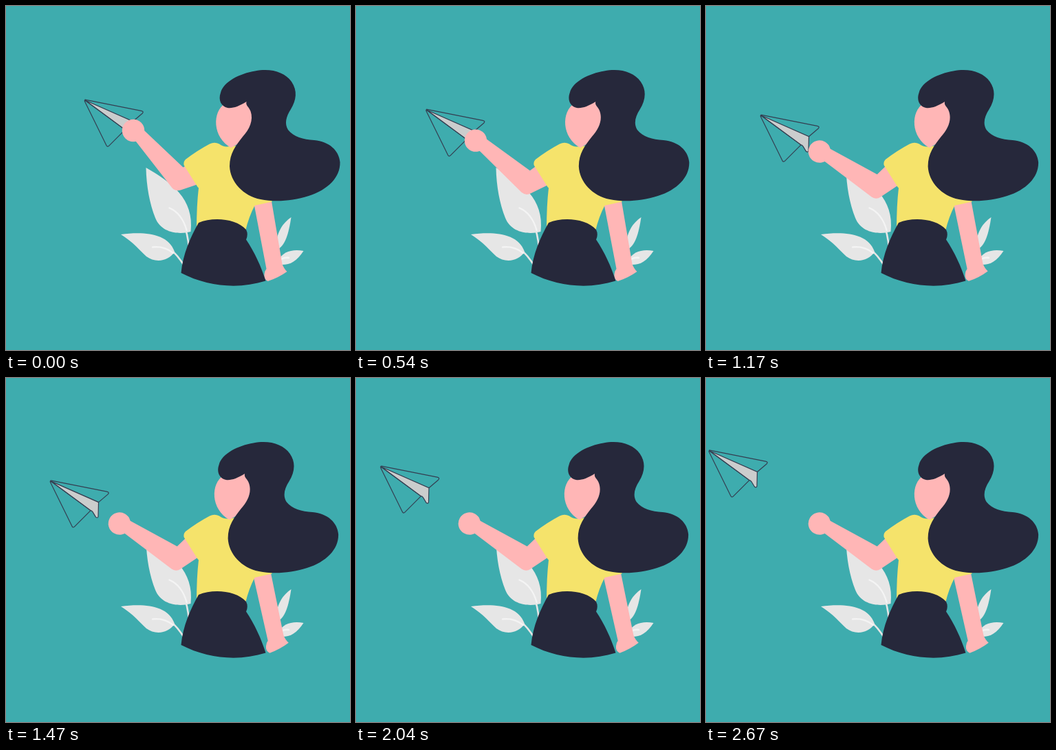
An HTML page for the animation above (2.73 s loop, 500 by 500 pixels).

```html
<!DOCTYPE html>
<html lang="en">
<head>
<meta charset="utf-8">
<title>Paper plane</title>
<style>
  html, body { margin: 0; width: 100%; height: 100%; overflow: hidden; background: #3eacae; }
  svg { display: block; width: 100vw; height: 100vh; }
  .leaf { fill: #e6e6e6; }
  .stem { fill: none; stroke: #e6e6e6; stroke-width: 2.6; }
  .vein { fill: none; stroke: #f4f4f4; stroke-width: 2.4; stroke-linecap: round; }
  .skin { fill: #ffb6b6; }
  .dark { fill: #26283b; }
  .shirt { fill: #f5e36b; }
  .plane path { fill: none; stroke: #343e51; stroke-width: 1.2; stroke-linejoin: round; }
  .plane .fold { fill: #cbcdcd; }
</style>
</head>
<body>
<svg viewBox="0 0 500 500">
  <rect width="500" height="500" fill="#3eacae"/>

  <g>
    <path class="stem" d="M258 316Q264 330 266 352M238 353Q249 361 260 379"/>
    <path class="leaf" d="M203.500 235C240 256 274 280 268.500 328C250 333 225 329 217 308C209 288 204 262 203.500 235Z"/>
    <path class="leaf" d="M167 332C198 328 235 329 245 357C237 371 217 374 204 364C193 354 186 344 167 332Z"/>
    <path class="vein" d="M237.500 293.500C250 299 258 309 262.500 326M213 350.500C225 349 234 352 243 359"/>
    <path class="leaf" d="M414.500 307C404 314 390 330 394 354C406 349 411 330 414.500 307Z"/>
    <path class="leaf" d="M432.500 356C416 353 402 357 396 370L398 376C412 377 422 372 432.500 356Z"/>
    <path class="vein" d="M400 368Q405 365 411 366"/>
  </g>

  <g id="plane" class="plane">
    <path d="M1.500 -.5L82 15.500Q86.500 16.500 83.500 19.500L70 31L1 1Q-1 -1 1.500 -.5Z"/>
    <path d="M.5 .5L58.500 43L35 66.500Q33 68.500 31.500 66L.5 3Q-1 0 .5 .5Z"/>
    <path class="fold" d="M1 .5L70 31L69.500 52Q68.500 54.500 66 52.500L61.500 45Q60 43 58.500 43Z"/>
  </g>

  <g id="arm" class="skin">
    <path d="M187 194.500L241.500 264.500Q247 270 254 267.500L288 256L280 222L257.500 234.500L201 181Z"/>
    <circle cx="185" cy="181" r="16.200"/>
  </g>

  <path id="side" class="skin" d="M359 280L385 278L401.500 375Q404 382 408.500 386Q396 395 380.500 400Q374.500 397 375.500 390Q376 385 378.500 382Z"/>

  <path class="shirt" d="M259 232Q257 227 261 223Q278 210 296 200.500Q303 197 310 200.500Q315 204.500 321 204.500L336 203L385 250L386.500 284.500L361.500 290Q353 306 348 327L345 340L277 325Q277 290 280 264.500L278.500 263Z"/>
  <path class="dark" d="M280 315C301 306 335 309 349 325Q352.500 332 349 339.500C361 357 371 379 377.500 399.500C338 412 293 408 254.500 388C257 361 268 336 280 315Z"/>

  <g id="head">
    <path class="skin" d="M319 141C299 154 300 191 327 206L345 196L362 160L350 134Z"/>
    <path class="dark" d="M349.500 139C338 146 330 149 322 148C313 146 308 137 312 126C316 110 340 98 362 94.500C385 90 405 96 415 110C424 123 422 137 414 150C407 161 404.500 171 410 180C418 190 432 194 448 195C470 197 484 210 485.500 227C486 249 468 267 440 276C415 284 390 285 370 281C345 276 326 256 325 233C325 214 334 203 344 190C354 179 360 166 355.500 153C353 146 348 145 349.500 139Z"/>
  </g>
</svg>
<script>
  const LOOP = 2730, STEP = 30, LAST = 2670;
  const THROW = 1080, RELEASE = 930, GLIDE = 1470;
  const el = id => document.getElementById(id);
  const plane = el("plane"), arm = el("arm"), side = el("side"), head = el("head");

  const ease = p => {
    p = Math.min(1, Math.max(0, p));
    return (1 - Math.cos(Math.PI * p)) / 2;
  };

  // Carried by the hand, then an arc into a straight glide.
  function planePos(t) {
    if (t <= RELEASE) {
      const k = ease(t / THROW);
      return [114.5 - 24.7 * k, 136.8 + 28 * k];
    }
    const x = 64.5 - 0.05 * (t - GLIDE);
    if (t >= GLIDE) return [x, 149.6 - 0.0367 * (t - GLIDE)];
    const s = t - RELEASE;
    return [x, 163.4 - 0.0139 * s - 2.15e-5 * s * s];
  }

  function draw(t) {
    const k = ease(t / THROW);
    const turn = ease((t - 900) / 540);
    plane.setAttribute("transform", `translate(${planePos(t)})`);
    arm.setAttribute("transform", `rotate(${-14.9 * k} 292 273)`);
    head.setAttribute("transform", `translate(${-2.4 * k} 0)`);
    side.setAttribute("transform", `rotate(${-1.9 * turn} 372 316)`);
  }

  const start = performance.now();
  function tick() {
    const t = (performance.now() - start) % LOOP;
    draw(Math.min(LAST, Math.floor(t / STEP) * STEP));
    requestAnimationFrame(tick);
  }
  draw(0);
  tick();
</script>
</body>
</html>
```
